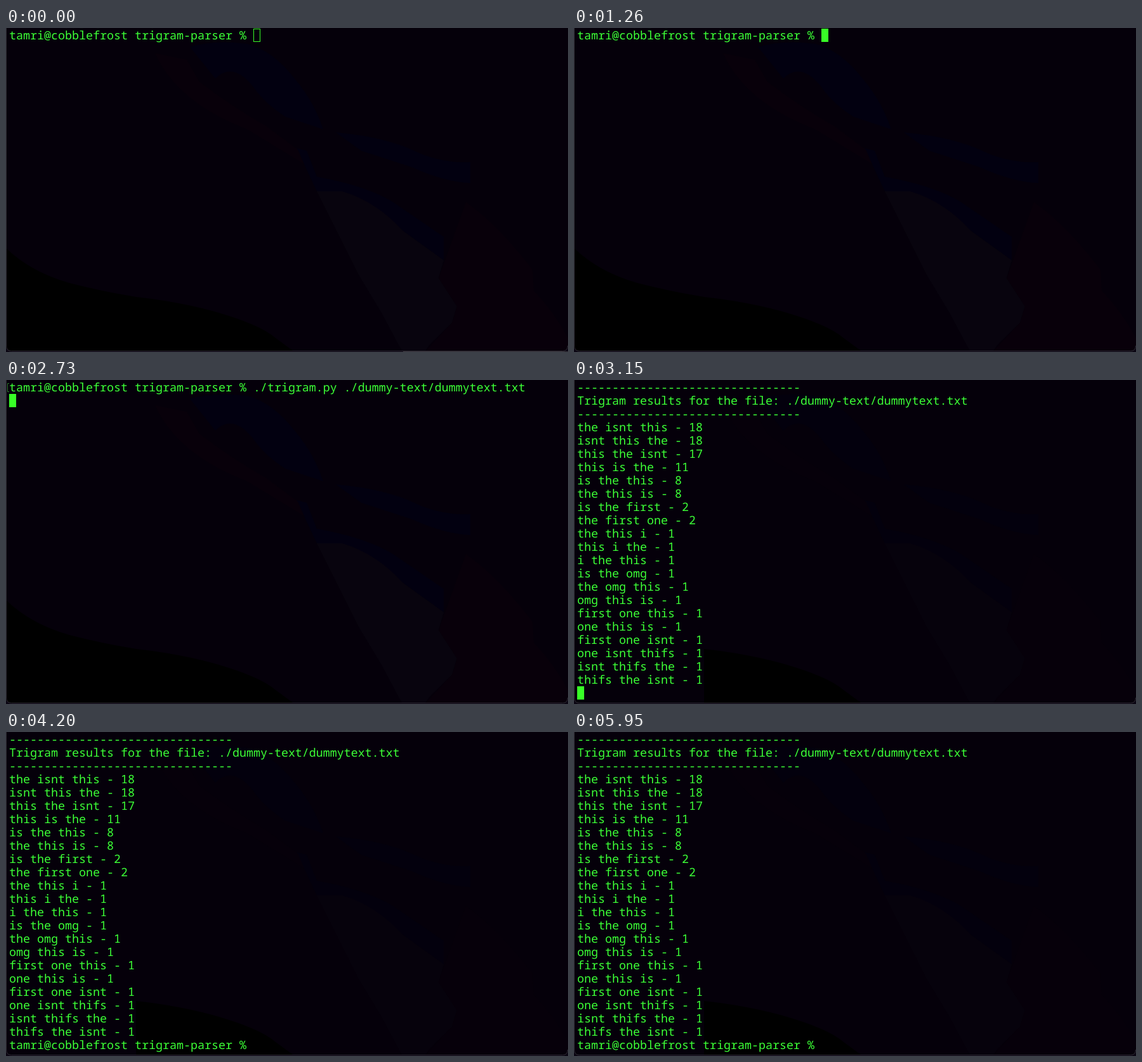
An HTML page that plays this animation: 886x512 px, repeating every 6090 ms.

```html
<!DOCTYPE html>
<html lang="en">
<head>
<meta charset="utf-8">
<title>Trigram parser</title>
<style>
html, body { margin: 0; width: 100%; height: 100%; overflow: hidden; background: #0a0512; }
svg { display: block; width: 886px; height: 512px; }
text {
  font: 18.333px "Noto Sans Mono", "DejaVu Sans Mono", monospace;
  fill: #3cff36; white-space: pre; text-rendering: geometricPrecision;
}
#cursor { fill: #38fe27; stroke: #38fe27; }
#cursor.hollow { fill: none; }
</style>
</head>
<body>
<svg viewBox="0 0 886 512">
  <clipPath id="window"><path d="M0 0H886V502Q886 510 878 510H8Q0 510 0 502Z"/></clipPath>
  <clipPath id="rest"><path d="M205 0H886V512H205Z"/></clipPath>
  <g clip-path="url(#window)">
    <path fill="#05000a" d="M0 0H886V512H0Z"/>
    <g id="wallpaper">
      <g fill="#020010">
        <path d="M290 30Q330 18 380 25Q420 35 455 80Q485 115 500 160L440 140Q410 120 395 100Q360 50 330 80Z"/>
        <path d="M520 165Q600 172 650 197Q690 214 732 212V245Q690 243 640 220L560 194Z"/>
        <path d="M458 190L474 194L490 235Q570 250 610 275L690 330V367L625 320Q570 262 490 258Z"/>
      </g>
      <path fill="#08040e" d="M490 258H530Q585 275 625 320L690 367L682 395L711 440L703 466L668 500L660 512H625L592 450L556 390Z"/>
      <g fill="#08000a">
        <path d="M235 40L285 50L305 85Q350 120 410 155L460 192L470 215L380 160Q270 118 235 40Z"/>
        <path d="M725 275Q775 310 830 382L832 415Q865 450 886 490V512H660L703 466L711 440L682 395Z"/>
      </g>
    </g>
    <path id="shade" d="M0 348Q40 386 100 403Q150 416 205 425Q270 432 325 447Q400 468 425 490L455 512H0Z"/>
  </g>
  <path fill="none" stroke="#2e2b34" d="M.5 0V502Q.5 510.500 8.500 510.500H877.500Q885.500 510.500 885.500 502"/>
  <path id="edge" stroke="#3a373f" d="M626 511.500H886"/>
  <g id="lines"></g>
  <path id="pointer" fill="none" stroke="#2c7a2c" d="M5 5.500H2.500V18.500H5"/>
  <rect id="cursor" width="10" height="20"/>
</svg>
<script>
const LOOP = 6090, CELL = 11, ROW = 21;
const $ = id => document.getElementById(id);
const file = "./dummy-text/dummytext.txt";
const prompt = "tamri@cobblefrost trigram-parser % ";
const command = prompt + "./trigram.py " + file;
const rule = "-".repeat(32);
const results = [
  rule, "Trigram results for the file: " + file, rule,
  "the isnt this - 18", "isnt this the - 18", "this the isnt - 17",
  "this is the - 11", "is the this - 8", "the this is - 8",
  "is the first - 2", "the first one - 2",
  ...["the this i", "this i the", "i the this", "is the omg", "the omg this",
    "omg this is", "first one this", "one this is", "first one isnt",
    "one isnt thifs", "isnt thifs the", "thifs the isnt"].map(s => s + " - 1")
];

// Each screen: start time and its lines; the cursor follows the last one.
const screens = [
  [0, [prompt]],
  [1540, [command]],
  [2730, [command, ""]],
  [3150, [...results, ""]],
  [3220, [...results, prompt]]
];
const blinks = [770, 1260, 3850, 4410, 4900, 5460, 5950];
let shown = null;

function showLines(lines) {
  $("lines").replaceChildren(...lines.map((line, i) => {
    const text = document.createElementNS("http://www.w3.org/2000/svg", "text");
    text.setAttribute("x", 5);
    text.setAttribute("y", 18 + i * ROW);
    text.textContent = line;
    return text;
  }));
  const row = lines.length - 1;
  $("cursor").setAttribute("x", 5.5 + lines[row].length * CELL);
  $("cursor").setAttribute("y", 1.5 + row * ROW);
}

function draw() {
  const t = performance.now() % LOOP;
  const screen = screens.findLast(s => s[0] <= t);
  if (screen !== shown) showLines((shown = screen)[1]);

  const focused = t >= 700, printed = t >= 3150;
  $("cursor").classList.toggle("hollow", !focused);
  $("cursor").style.opacity = blinks.filter(b => b <= t).length % 2 ? 0 : 1;
  $("edge").style.opacity = focused ? 0 : 1;
  $("pointer").style.opacity = t >= 2730 && !printed ? 1 : 0;
  $("wallpaper").style.opacity = printed ? 0.6 : 1;
  $("shade").style.clipPath = printed ? "url(#rest)" : "none";
  requestAnimationFrame(draw);
}
draw();
</script>
</body>
</html>
```
